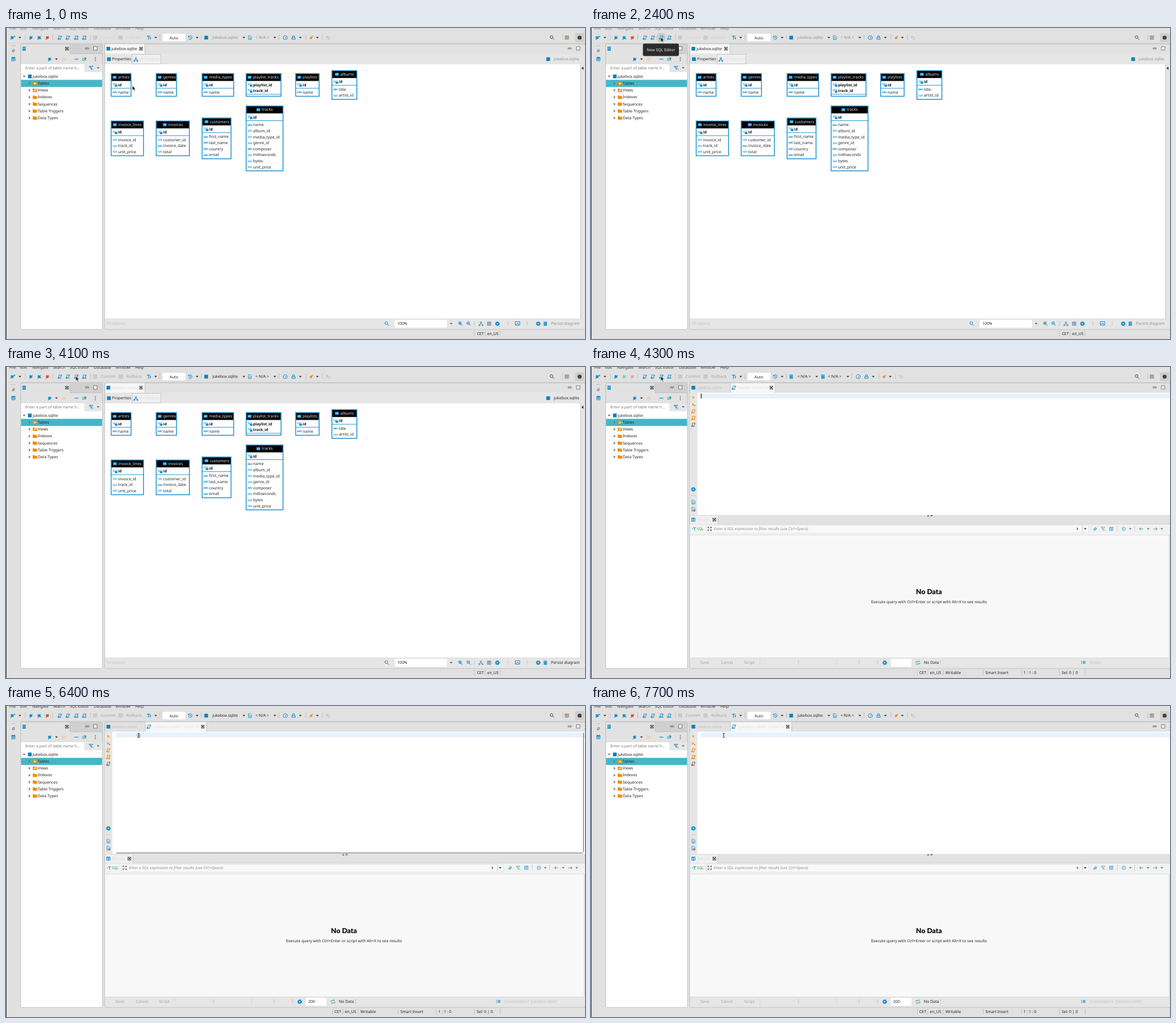
These frames come from a looping animation (1021 by 549 pixels, 8 s). An HTML page:

```html
<!DOCTYPE html>
<html lang="en">
<head>
<meta charset="utf-8">
<title>Database tool</title>
<style>
html, body { margin: 0; width: 100%; height: 100%; overflow: hidden; background: #e1e1e1; }
svg { display: block; width: 1021px; height: 549px; --fg: #222; --menu: #333; --dim: #a2a2a2; --tab: #dedede; }
text { font: 6.92px "Noto Sans", "Open Sans", sans-serif; fill: #222; white-space: pre; text-rendering: geometricPrecision; }
.fg { fill: var(--fg); }
.menu { fill: var(--menu); }
.dim { fill: var(--dim); }
.tab { fill: var(--tab); }
.faint { fill: #dedede; }
.pale { fill: #c0c0c0; }
.gray { fill: #a2a2a2; }
.light { fill: #e8e8e8; }
.key { font-weight: 600; font-size: 6.7px; fill: #111; }
.type { font-weight: 600; font-size: 4.6px; fill: #0b8ccf; }
.mid { text-anchor: middle; }
.hint { font-style: italic; fill: #8f8f8f; }
.entry { fill: #777; }
.sql { font-weight: 500; font-size: 6.3px; fill: #159a2c; }
.head { font: 900 12.3px Lato, "Noto Sans", sans-serif; fill: #111; text-anchor: middle; }
</style>
</head>
<body>
<svg id="stage" viewBox="0 0 1021 549" xmlns="http://www.w3.org/2000/svg"></svg>
<script>
const BLUE = '#0b8ccf', ORANGE = '#f08a00', DARK = '#3a3a3a', GRAY = '#b9b9b9';

// Drawing helpers; y of text and icons is the vertical centre.
const text = (x, y, s, cls = '') =>
  `<text x="${x}" y="${y + 2.5}" class="${cls}">${s.replace(/</g, '&lt;').replace(/>/g, '&gt;')}</text>`;
const box = (x, y, w, h, fill, more = '') => `<rect x="${x}" y="${y}" width="${w}" height="${h}" fill="${fill}" ${more}/>`;
const fill = (x, y, d, c) => `<path transform="translate(${x} ${y})" d="${d}" fill="${c}"/>`;
const line = (x, y, d, c, w = 1, more = '') =>
  `<path transform="translate(${x} ${y})" d="${d}" fill="none" stroke="${c}" stroke-width="${w}" ${more}/>`;
const group = (id, ...parts) => `<g id="${id}">${parts.join('')}</g>`;
const DASH = 'stroke-dasharray="1 1"';

// Icons
const down = (x, y, c = DARK) => fill(x, y, 'M-2.5-1.2H2.5L0 1.5Z', c);
const right = (x, y, c = '#777') => fill(x, y, 'M-1.3-2.6V2.6L1.7 0Z', c);
const dots = (x, y, n = 5) => line(x, y, `M0 ${-n}V${n}`, '#999', .9, DASH);
const square = (x, y, c = '#1280b8') => box(x - 3.3, y - 3.3, 6.6, 6.6, c);
const plug = (x, y, c) => fill(x, y, 'M-3-1L-.8-3 1-1.4 2.6-3 3.3-2.3 1.8-.6 3 .8 1 2.6-.8 2.4-2.5 3.8-3.3 3-1.9 1.4Z', c);
const script = (x, y, c = BLUE) => line(x, y, 'M-1.8 3V-3H3.2V-1.4H1.6V3.2H-3.4V1.6H0', c, .9);
const stack = (x, y, c = BLUE) => [-2.6, 0, 2.6].map(d => box(x - 3.2, y + d - 1, 6.4, 1.9, c, 'rx=".8"')).join('');
const gear = (x, y, c = BLUE) => `<circle cx="${x}" cy="${y}" r="3.3" fill="none" stroke="${c}" stroke-width="1.6" stroke-dasharray="1.6 1"/>`
  + `<circle cx="${x}" cy="${y}" r="2.1" fill="none" stroke="${c}" stroke-width="1.8"/>`;
const gauge = (x, y) => line(x, y, 'M-2.4 3A3.7 3.7 0 1 1 2.4 3ZM0 1L1.6-1.4', BLUE, 1);
const lens = (x, y, c = BLUE, sign = '') => line(x, y, `M1 1L3.6 3.6M1.4-1A2.4 2.4 0 1 1-3.4-1 2.4 2.4 0 1 1 1.4-1${sign}`, c);
const page = (x, y, c = BLUE) => line(x, y, 'M-2.6-3.4H1L2.8-1.6V3.4H-2.6ZM-1.2 0H1.4M-1.2 1.8H1.4', c, .8);
const grid = (x, y, c = BLUE) => line(x, y, 'M-3-3H3V3H-3ZM-3-1.8H3M-3 .6H3M0-2V3', c, .9);
const nodes = (x, y, c = BLUE) => line(x, y, 'M-1.2-3.2H1.2V-1.2H-1.2ZM0-1.2V.8M-2.8 2V.8H2.8V2M-3.8 2H-1.8V3.6H-3.8ZM1.8 2H3.8V3.6H1.8Z', c, .9);
const cross = (x, y) => line(x, y, 'M-2.2-2.2L2.2 2.2M2.2-2.2L-2.2 2.2', '#444', 1.3)
  + box(x - 2.8, y - 2.8, 5.6, 5.6, 'none', 'stroke="#555" stroke-width=".6"');
const clock = (x, y) => line(x, y, 'M-2.8-1.8A3.2 3.2 0 1 1-3.1 1M-3.4-3V-1H-1.4M0-1.8V.2L1.4 1', BLUE);
const funnel = (x, y, c) => line(x, y, 'M-3.6-3H3.2L.6 .2V3.4L-1-2V.2ZM2 1L4 3.6', c, .9);
const arrowX = (x, y, s, c) => line(x, y, `M${-3.4 * s} 0H${3 * s}M${.6 * s}-2.4L${3.2 * s} 0 ${.6 * s} 2.4`, c, 1.1);
const winButtons = (a, b) => line(a, 36, 'M-2.8-1H2.8V1H-2.8Z', '#555', .8) + box(b - 3, 33, 6, 6, '#fff', 'stroke="#555" stroke-width=".8"');
const folder = (x, y) => fill(x, y, 'M-3.8-3H-.8L.2-2H3.8V3H-3.8Z', ORANGE);
const tableIcon = (x, y) => box(x - 3.4, y - 2.6, 6.8, 5.2, '#1591d2', 'rx=".6"')
  + line(x, y, 'M-2.4-.5H2.4M-2.4 1.2H2.4', '#d6efff', .7);

function chrome() {
  const menu = [[6, 'File'], [25, 'Edit'], [46, 'Navigate'], [83, 'Search'], [112.5, 'SQL Editor'], [155, 'Database'], [193, 'Window'], [228, 'Help']];
  return box(0, 0, 1021, 549, '#e1e1e1') + box(0, 0, 1, 549, '#3c3c3c') + box(1, 26.5, 1020, .8, '#d2d2d2')
    + menu.map(([x, s]) => text(x, .8, s, 'menu')).join('')
    + plug(11, 17, BLUE) + line(15, 15, 'M-1.5 0H1.5M0-1.5V1.5', BLUE, .9) + down(24.5, 17) + dots(34, 17)
    + plug(44, 17, BLUE)
    + group('plugs', plug(58.5, 17, BLUE), line(61, 19, 'M-1.6 0H1.6', '#22a060', 1), plug(73, 17, '#e04a2f')) + dots(82.5, 17)
    + [95, 109, 124, 138].map((x, i) => script(x, 17) + (i ? box(x + 1.6, 18.6, 1.8, 1.6, i == 1 ? GRAY : BLUE) : '')).join('')
    + dots(149, 17) + grid(157, 17, GRAY) + text(167, 16.5, 'Commit', 'dim')
    + grid(202, 17, GRAY) + text(212, 16.5, 'Rollback', 'dim')
    + line(252, 17, 'M-3.6-2.6H2.4M-.8-2.6V3.4M1 0H4M2.5 0V3', BLUE, 1.1) + down(264, 17) + dots(271.5, 17)
    + box(275.5, 9.5, 41.5, 14.5, '#fff', 'rx="1" stroke="#d0d0d0" stroke-width=".6"') + text(296, 17, 'Auto', 'mid')
    + clock(325, 17) + down(337, 17) + dots(344.5, 17)
    + group('tail', gauge(492.5, 17), line(507, 17, 'M-3 0H3V3H-3ZM-1.6 0V-3H1.6V0', BLUE), down(519, 17), dots(529, 17),
        fill(538, 17, 'M3.8-3.8L1.6 1.2-.6 3.8-.8 1.8-3 1.2-1.8-.6Z', '#e58a2d'), down(549, 17), dots(558, 17),
        line(568, 17, 'M-3.2-1H1A2 2 0 0 1 1 3H-1M-1-3L-3.2-1-1 1', GRAY))
    + lens(963, 17, '#444') + dots(982, 17) + grid(989, 17, '#777') + box(991, 13, 2, 2, '#e8b020')
    + box(1003.5, 9, 16, 16, '#cecece', 'rx="1.5"') + '<circle cx="1011.5" cy="17" r="3.6" fill="#4a4038"/>';
}

function sidebar() {
  const rows = ['Tables', 'Views', 'Indexes', 'Sequences', 'Table Triggers', 'Data Types'];
  return line(13, 31, 'M-3.5 0H4', '#888', .8, DASH)
    + line(13, 40, 'M-1-2H2V1H-1ZM-2 0V2H1', '#666', .8) + grid(13, 55) + box(10, 51.5, 6, 2, BLUE)
    + box(26, 28, 144, 504, '#e2e2e2', 'rx="2" stroke="#b4b4b4" stroke-width=".9"')
    + box(113, 28.5, 56.6, 17, '#d0d0d0') + line(113, 28.5, 'M0 0V17H57', '#b9b9b9', .7)
    + stack(32, 36.5) + cross(107.5, 36.5) + winButtons(143, 157.5)
    + plug(77, 55, BLUE) + down(89, 55) + fill(102, 55, 'M-3.6-2.6H-.6L.2-1.8H3.6V2.8H-3.6Z', '#ecd3b0')
    + line(124, 55, 'M-3.5 0H3.5', BLUE, 1.2) + arrowX(138, 53.8, 1, BLUE) + line(138, 56.4, 'M3.4 0H-3.4L-1.4 1.5', '#2a9d50', .9)
    + line(157.5, 55, 'M0-3.6V4', '#555', 1.4, 'stroke-dasharray="1.6 1.2"')
    + box(26.5, 64, 143, 467.5, '#fff') + box(138, 64, 31.5, 14, '#e6e6e6')
    + text(34, 70.2, 'Enter a part of table name h...', 'entry')
    + funnel(150, 70.5, BLUE) + down(162.5, 70.5, '#666')
    + down(32, 85.5, '#666') + square(42, 85.5) + text(47, 85, 'jukebox.sqlite')
    + box(26.5, 91.5, 143, 12.6, '#45b6c6')
    + rows.map((s, i) => {
        const y = 97.7 + i * 12.22;
        return right(41.5, y) + folder(51, y) + (i < 2 ? box(49, y - 1, 4, 2.6, '#ffe0a8') : '') + text(56, y - .3, s);
      }).join('');
}

const tables = [
  ['artists', 185.5, 80.5, 35, 197.5, 'id', 'A name'],
  ['genres', 264.8, 80.5, 35.8, 277, 'id', 'A name'],
  ['media_types', 345.8, 80.5, 55.7, 358, 'id', 'A name'],
  ['playlist_tracks', 423.5, 80.5, 61.5, 435.5, 'playlist_id track_id', ''],
  ['playlists', 510.8, 80.5, 41.4, 523, 'id', 'A name'],
  ['albums', 574.7, 75.3, 44, 589.5, 'id', 'A title,1 artist_id'],
  ['invoice_lines', 185.5, 164.2, 57, 198, 'id', '1 invoice_id,1 track_id,1 unit_price'],
  ['invoices', 264.8, 164.2, 58.6, 286, 'id', '1 customer_id,A invoice_date,1 total'],
  ['customers', 345.8, 158.9, 51, 359.5, 'id', 'A first_name,A last_name,A country,A email'],
  ['tracks', 423.5, 137.7, 65, 451, 'id',
    'A name,1 album_id,1 media_type_id,1 genre_id,A composer,1 milliseconds,1 bytes,1 unit_price'],
];

function entity([name, x, y, w, tx, keyList, colList]) {
  const step = 10.65, keys = keyList.split(' '), cols = colList ? colList.split(',') : [];
  const rule = y + 25.8 + (keys.length - 1) * step;
  const h = 40 + (keys.length + cols.length - 2) * step;
  const type = (yy, s) => text(x + 2.2, yy - 1.2, s == 'A' ? 'ABC' : '123', 'type');
  return box(x, y, w, h, '#fff', `stroke="${BLUE}" stroke-width="1.4"`)
    + box(x + .7, y + .7, w - 1.4, 12.3, '#000') + tableIcon(tx - 6, y + 6.4) + text(tx, y + 6.2, name, 'light')
    + line(x, rule, `M0 0H${w}`, BLUE, .9)
    + keys.map((s, i) => {
        const yy = y + 19.6 + i * step;
        return type(yy - .6, '1') + box(x + 6.5, yy + .3, 4.6, 3.2, BLUE) + text(x + 12.3, yy, s, 'key');
      }).join('')
    + cols.map((c, i) => {
        const yy = y + 33 + i * step;
        return type(yy + .6, c[0]) + text(x + 12.3, yy, c.slice(2));
      }).join('');
}

const panel = () => box(174, 28, 850, 504, '#e2e2e2', 'rx="2" stroke="#b4b4b4" stroke-width=".9"') + winButtons(994, 1009);
const footer = () => box(174.5, 513, 847, 18.5, '#e6e6e6') + box(174.5, 513, 847, .7, '#d6d6d6');

function diagram() {
  return group('diagram', panel(),
    box(175, 28.6, 70, 17, '#f7f7f7') + line(245, 28.5, 'M0 0V17', '#b9b9b9', .8),
    square(180.5, 36.5) + text(186, 36.2, 'jukebox.sqlite', 'tab') + cross(238, 36.5),
    square(353, 17) + text(364, 16.7, 'jukebox.sqlite', 'fg') + down(419.5, 17) + page(430, 17)
      + text(440, 16.7, '< N/A >', 'fg') + down(474, 17) + dots(481.5, 17),
    box(175, 45.6, 846, 18, '#e6e6e6') + box(222.5, 46.5, 50.5, 17, '#f0f0f0', 'stroke="#bbb" stroke-width=".8"'),
    square(181.5, 55) + text(187, 54.7, 'Properties') + nodes(229, 55.5) + text(235, 54.7, 'ER Diagram', 'faint'),
    square(956, 55) + text(966, 54.5, 'jukebox.sqlite', 'fg'),
    box(174.5, 64, 839, 449, '#fff') + box(1013, 64, 8, 449, '#e6e6e6') + line(1013.3, 64, 'M0 0V449', '#b5b5b5', .8)
      + fill(1016.8, 71, 'M1.5-3V3L-2 0Z', '#333'),
    tables.map(entity).join(''), footer(),
    text(177, 521.7, '10 objects', 'pale') + lens(671.5, 522),
    box(685.5, 515, 92, 14, '#fff') + text(690, 521.8, '100%') + down(785, 522, '#666'),
    lens(801.5, 522, BLUE, 'M-2.6-1H.6M-1-2.6V.6') + lens(816, 522, BLUE, 'M-2.6-1H.6'),
    dots(826, 522, 4) + nodes(837.5, 522, '#4c8fb5') + grid(852, 522, '#4c7f9f') + gear(866.5, 522) + dots(885, 522, 4),
    line(902, 521.5, 'M-4-3H4V3H-4ZM-3 2L0-.5 3 2', BLUE, 1) + dots(919, 522, 4) + gear(938.5, 522) + stack(951, 522),
    text(961, 521.7, 'Persist diagram', 'fg'),
    text(830.5, 539.8, 'CET') + text(848.5, 539.8, 'en_US') + dots(826, 540) + dots(845, 540) + dots(871, 540));
}

function editor() {
  const stats = [[579, 'CET'], [597.5, 'en_US'], [625, 'Writable'], [695.5, 'Smart Insert'], [762.5, '1 : 1 : 0'], [830, 'Sel: 0 | 0']];
  const common = [panel(),
    square(180.5, 36.5) + text(186, 36.2, 'jukebox.sqlite', 'pale'),
    box(174.5, 45.5, 847, 216, '#fff') + box(174.5, 45.5, 13, 216, '#e6e6e6') + box(194, 47, 827, 8.5, '#e8f2fe'),
    right(180.5, 53.5, ORANGE) + right(180, 66, ORANGE) + box(181.5, 67, 2.5, 2, ORANGE),
    script(180.5, 78, ORANGE) + script(180.5, 90, ORANGE) + box(181.6, 91.4, 2, 2, ORANGE) + script(180.5, 102, '#666'),
    gear(180.5, 216) + line(180.5, 227, 'M-4 0H4', '#888', .8, DASH),
    page(180.5, 238.5) + page(180.5, 251) + box(181.5, 252, 2.5, 2.5, '#e04a2f'),
    box(174.5, 261.3, 847, 16, '#e2e2e2') + line(174.5, 277.4, 'M0 0H847', '#d2d2d2', .8),
    fill(594.5, 262.5, 'M-2 1.2H2L0-1.4Z', '#555a78') + down(600.5, 262.6, '#555a78'),
    box(175, 263, 49, 14.5, '#f0f0f0') + line(224, 263, 'M0 0V14.4', '#bbb', .8),
    grid(180.5, 269.5) + text(187, 269.2, 'Results', 'faint') + cross(217.5, 269.5),
    box(174.5, 278, 847, 18.5, '#f2f2f2') + box(204, 279.5, 673, 13.5, '#f9f9f9', 'stroke="#d8d8d8" stroke-width=".6"'),
    line(182, 285.7, 'M-4 0H-2M-2-2H3M.6-2V3', '#18a0b0', 1.1) + text(187, 285.8, 'SQL', 'sql'),
    line(209.3, 285.7, 'M-3.2-1V-3.2H-1M1-3.2H3.2V-1M3.2 1V3.2H1M-1 3.2H-3.2V1M-3-3L-.8-.8M3-3L.8-.8M3 3L.8 .8M-3 3L-.8 .8', '#555', .9),
    text(216.5, 285.3, 'Enter a SQL expression to filter results (use Ctrl+Space)', 'hint'),
    right(858, 285.7) + down(871.5, 285.7) + line(866.5, 279.5, 'M0 0V13', '#bbb', .7),
    fill(889, 285.7, 'M-3.8 1L.6-3.4 3.8-.2 .2 3.2H-1.8Z', '#7cbfe0'),
    funnel(903, 285.7, '#5ab8b0') + grid(917.5, 285.7, '#4ca6d6'),
    dots(928, 285.7) + gear(939.5, 285.7, '#9cc9e0') + down(951, 285.7, '#777') + dots(958.5, 285.7),
    arrowX(970.5, 285.7, -1, '#58b868') + down(982.5, 285.7, '#777') + arrowX(995, 285.7, 1, '#58b868') + down(1006.5, 285.7, '#777'),
    box(174.5, 296.5, 845, 216.5, '#f8f8f8') + line(174.5, 296.6, 'M0 0H846M845 0V216', '#d8d8d8', .8),
    text(596, 398.7, 'No Data', 'head'),
    text(596, 414.5, 'Execute query with Ctrl+Enter or script with Alt+X to see results', 'mid'),
    footer(), text(193, 521.3, 'Save', 'gray') + text(229, 521.3, 'Cancel', 'gray') + text(270, 521.3, 'Script', 'gray'),
    [366, 473, 505, 616.5].map(x => dots(x, 522, 4)).join('') + line(298, 515, 'M0 0V14M135 0V14', '#cfcfcf', .7),
    gear(518, 522) + box(529, 515, 36, 14, '#fff'),
    line(576.5, 522, 'M-3.5 0V-2H2.8M1-3.8L3 -2M3.5 0V2H-2.8M-1 3.8L-3 2', '#35a860', 1) + text(587, 521.5, 'No Data'),
    line(868, 521.5, 'M-3 -3V3', '#5ba4c8', 1) + box(867, 519, 5, 5, '#6ab4da'),
    stats.map(([x, s]) => text(x, 539.8, s)).join('') + [576, 594, 621, 691.5, 759, 826, 871.5].map(x => dots(x, 540)).join('')];
  const tab = (w, title) => box(246, 28.6, w, 17, '#f7f7f7') + line(246, 28.5, `M0 0V17M${w} 0V17`, '#b9b9b9', .8)
    + script(252, 36.5) + text(258, 36.2, title, 'faint') + cross(246 + w - 7, 36.5);
  return group('editor', ...common)
    + group('pending', tab(79, '<none> Script-10'), stack(353, 17), text(364, 16.7, '< N/A >'), down(398, 17),
        stack(409, 17), text(418, 16.7, '< N/A >'), down(453, 17), dots(460, 17), text(879, 521.3, 'Empty', 'pale'))
    + group('linked', tab(108, '<jukebox.sqlite> Script-10'), square(353, 17), text(364, 16.7, 'jukebox.sqlite'), down(419.5, 17),
        page(430, 17), text(440, 16.7, '< N/A >'), down(474, 17), dots(481.5, 17),
        text(533, 521.8, '200'), text(879, 521.3, "Connected to 'jukebox.sqlite'", 'pale'))
    + group('bars', line(0, 0, 'M1018.4 48V257.5M195 259.6H1016.5', '#858585', 1.5, 'stroke-linecap="round"'))
    + group('caret', box(193.7, 47, 1.2, 8.6, '#000'));
}

const stage = document.getElementById('stage');
stage.innerHTML = chrome() + sidebar() + diagram() + editor()
  + group('tip', box(91.5, 27.5, 63.5, 22, '#2b2b2b', 'rx="3"'), text(123.3, 38.3, 'New SQL Editor', 'mid light'))
  + '<circle id="halo" fill="#5a6a70"/>'
  + group('arrow', '<path d="M0 0V8.2L1.9 6.5 3.2 9.5 4.6 8.9 3.3 6 5.8 5.8Z" fill="#1c1c1c" stroke="#fff" stroke-width=".6"/>')
  + group('beam', line(0, 0, 'M-1.8-3.6H-.5L0-3 .5-3.6H1.8M0-3V3M-1.8 3.6H-.5L0 3 .5 3.6H1.8', '#222', .9));

const el = id => document.getElementById(id);
const show = (id, on) => { el(id).style.display = on ? '' : 'none'; };
const mix = (a, b, k) => { const v = Math.round(a + (b - a) * k); return `rgb(${v},${v},${v})`; };

// Click halo: time, radius, opacity; held until the next row.
const halos = [[0, 0, 0], [2000, 6, .3], [2100, 15, .16], [2200, 16.5, .1], [2300, 13, .13], [2400, 8.5, .17], [3000, 0, 0],
  [6400, 3.8, .3], [6800, 13, .16], [7100, 15, .1], [7400, 9, .06], [7700, 0, 0]];
// Pointer: time, x, y; eased between rows.
const path = [[0, 222.8, 101.8], [300, 222.8, 101.8], [1200, 126.5, 21.5], [1400, 123, 16.3], [4800, 123, 16.3], [5500, 234, 52]];
const held = (rows, t) => rows.filter(r => r[0] <= t).pop();

function pointer(t) {
  const i = path.findIndex(p => p[0] > t);
  if (i < 0) return path[path.length - 1].slice(1);
  const [t0, x0, y0] = path[i - 1], [t1, x1, y1] = path[i];
  const k = (t - t0) / (t1 - t0), e = k * k * (3 - 2 * k);
  return [x0 + (x1 - x0) * e, y0 + (y1 - y0) * e];
}

function draw(now) {
  const t = Math.floor(now % 8000 / 100) * 100;
  const active = t < 3000 ? 0 : t < 3100 ? .5 : 1;
  const open = t >= 4300, linked = t >= 4500;
  stage.style.setProperty('--fg', mix(145, 34, active));
  stage.style.setProperty('--menu', mix(125, 51, active));
  stage.style.setProperty('--dim', mix(207, 162, active));
  stage.style.setProperty('--tab', mix(34, 222, active));
  show('diagram', !open);
  show('editor', open);
  show('pending', open && !linked);
  show('linked', linked);
  el('plugs').style.opacity = open && !linked ? .4 : 1;
  el('tail').setAttribute('transform', `translate(${open && !linked ? -21.3 : 0} 0)`);
  show('tip', t >= 1900 && t < 3000);
  el('tip').style.opacity = t < 2000 ? .5 : 1;
  show('caret', (t >= 4300 && t < 4900) || (t >= 7100 && t < 7700));
  show('bars', t >= 5300 && t < 7400);
  el('bars').style.opacity = t < 5400 || t >= 7100 ? .5 : 1;

  const [x, y] = pointer(t), beam = t > 5000 && y > 45;
  show('arrow', !beam);
  show('beam', beam);
  for (const id of ['arrow', 'beam']) el(id).setAttribute('transform', `translate(${x} ${y})`);
  const [, r, a] = held(halos, t), halo = el('halo');
  halo.setAttribute('cx', open ? 234 : 123.7);
  halo.setAttribute('cy', open ? 52 : 17);
  halo.setAttribute('r', r);
  halo.setAttribute('opacity', a);
}

const start = performance.now();
function tick() {
  draw(performance.now() - start);
  requestAnimationFrame(tick);
}
tick();
</script>
</body>
</html>
```
